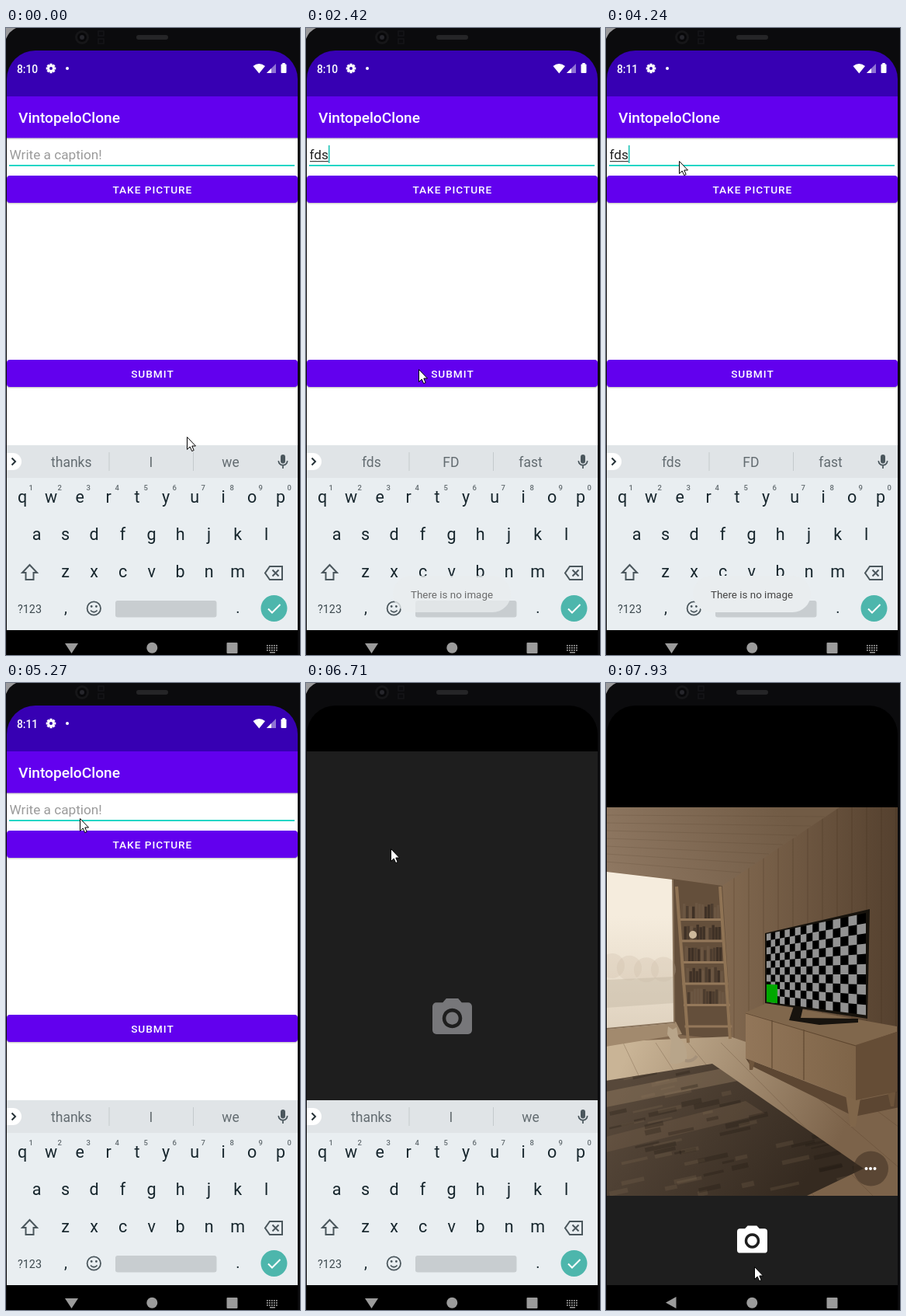
An HTML page with a canvas that plays this animation: 379x807 px, repeating every 8000 ms.

```html
<!DOCTYPE html>
<html lang="en">
<head>
<meta charset="utf-8">
<title>Phone demo</title>
<style>
html, body { margin: 0; width: 100%; height: 100%; overflow: hidden; background: #0b0b0d; }
canvas { display: block; }
</style>
</head>
<body>
<canvas id="stage" width="379" height="807"></canvas>
<script>
const c = document.getElementById('stage').getContext('2d');
const LOOP = 8000;
const PRESS_SUBMIT = 2180, TYPE = 1330, ERASE = 4300, PRESS_TAKE = 5390;
const LEAVE = 6590, CAMERA = 6710, HIDE_KEYS = 7650, PREVIEW = 7780;

// Pointer moves: start ms, end ms, x, y
const moves = [
  [0, 0, 233, 526], [0, 630, 126, 192], [630, 1020, 98, 172], [1020, 1330, 106, 200],
  [1330, 1870, 145, 439], [2660, 2810, 214, 686], [2810, 3000, 189, 764],
  [3080, 3840, 94, 171], [5200, 5640, 109, 213], [6990, 7650, 183, 775], [7780, 7930, 191, 751]
];

const clamp = v => Math.min(1, Math.max(0, v));
const mix = (a, b, k) => a + (b - a) * k;

function pointer(t) {
  let x = 0, y = 0;
  for (const [from, to, x1, y1] of moves) {
    if (t < from) break;
    const k = to > from ? clamp((t - from) / (to - from)) : 1;
    const e = k * k * (3 - 2 * k);
    x = mix(x, x1, e);
    y = mix(y, y1, e);
  }
  return [x, y];
}
function typed(t) {
  const erased = Math.max(0, Math.ceil((t - ERASE) / 190));
  return t < TYPE ? '' : 'fds'.slice(0, Math.max(0, 3 - erased));
}
const caretOn = t => t >= 510 && t < 5210 && Math.floor((t - TYPE) / 485) % 2 === 0;

function rect(x, y, w, h, fill, r = 0) {
  c.fillStyle = fill;
  c.beginPath();
  c.roundRect(x, y, w, h, r);
  c.fill();
}
function disc(x, y, r, fill) {
  c.fillStyle = fill;
  c.beginPath();
  c.arc(x, y, r, 0, 7);
  c.fill();
}
function shape(d, fill) {
  c.fillStyle = fill;
  c.fill(new Path2D(d), 'evenodd');
}
function stroke(d, color, w = 2) {
  c.strokeStyle = color;
  c.lineWidth = w;
  c.stroke(new Path2D(d));
}
function text(s, x, y, size, fill, { weight = 400, align = 'left', gap = 0 } = {}) {
  c.font = `${weight} ${size}px Roboto, sans-serif`;
  c.letterSpacing = gap + 'px';
  c.textAlign = align;
  c.fillStyle = fill;
  c.fillText(s, x, y);
}
function fade(color0, color1, x0, y0, x1, y1) {
  const g = c.createLinearGradient(x0, y0, x1, y1);
  g.addColorStop(0, color0);
  g.addColorStop(1, color1);
  return g;
}
function seeded(seed) {
  return () => (seed = seed * 16807 % 2147483647) / 2147483647;
}

function phone() {
  rect(0, 0, 379, 807, '#0b0b0d');
  shape('M0 0H13Q4 4 0 14Z', '#9a9a9c');
  disc(98, 12, 9, '#161618');
  disc(98, 12, 6, '#08080a');
  disc(98, 12, 3, '#26262b');
  stroke('M119 4h7v6h-7zM119 14h7v6h-7z', '#161618', 1.5);
  rect(168, 9, 41, 6, '#252527', 3);
}

function statusBar(t) {
  rect(0, 29, 379, 59, '#3700b3');
  text(t < 3200 ? '8:10' : '8:11', 14, 57.5, 13.8, '#fff', { weight: 500 });
  for (let i = 0; i < 8; i++) {
    c.save();
    c.translate(58, 52);
    c.rotate(i * Math.PI / 4);
    rect(-1.6, -6.3, 3.2, 4, '#fff');
    c.restore();
  }
  disc(58, 52, 4.7, '#fff');
  disc(58, 52, 2, '#3700b3');
  disc(79, 52, 2, '#fff');
  if (t >= 5640) {
    shape('M302.5 51a4.5 4.5 0 0 1 9 0q0 3-4.5 7.5q-4.5-4.5-4.5-7.5z', '#fff');
    disc(307, 51, 3, '#3700b3');
    disc(307, 51, 1.4, '#fff');
  }
  shape('M318.5 49Q326.3 43 334 49L326.3 58.5Z', '#fff');
  shape('M348 46V58H336Z', '#8f73d4');
  shape('M342 52V58H336Z', '#fff');
  rect(354.5, 46.5, 7, 11.5, '#fff', 1);
  rect(356.3, 45, 3.4, 2, '#fff');
}

function button(label, y, pressed, t) {
  rect(1, y + 1, 375, 35.5, 'rgba(0,0,0,.18)', 4);
  rect(1, y, 375, 35, '#6200ee', 4);
  const k = (t - pressed) / 240;
  if (k >= 0 && k < 1) {
    c.save();
    c.beginPath();
    c.roundRect(1, y, 375, 35, 4);
    c.clip();
    disc(...pointer(t), 100 + 280 * k, `rgba(255,255,255,${.24 * (1 - k)})`);
    c.restore();
  }
  text(label, 188.9, y + 23, 13.7, '#fff', { weight: 500, align: 'center', gap: .95 });
}

function form(t) {
  const leaving = t >= LEAVE;
  rect(0, 88, 379, 450, '#fff');
  statusBar(t);
  c.save();
  if (leaving) c.translate(0, -.8);
  rect(0, 141, 379, 3, fade('#bbb', '#fff', 0, 141, 0, 144));
  rect(0, 88, 379, 53.5, '#6200ee');
  text('VintopeloClone', 16, 122, 19.15, '#fff', { weight: 500 });

  const word = typed(t);
  text(word || 'Write a caption!', 4.5, 169, 17.2, word ? '#222' : '#9a9a9a');
  const w = word ? c.measureText(word).width : 0;
  rect(5, 171, w, 1.2, '#444');
  if (caretOn(t)) rect(4.5 + w, 151, 1.8, 23, '#2fc9bd');
  rect(4, 176, 368, 2, '#25d6c6');

  button('TAKE PICTURE', 190, PRESS_TAKE, t);
  button('SUBMIT', 427, PRESS_SUBMIT, t);
  c.restore();
  if (leaving) rect(0, 29, 379, 508, 'rgba(0,0,0,.05)');
}

function keyboard(t) {
  const ink = '#17262d', icon = '#4b575d', soft = '#636c71';
  const spread = (items, x, step, draw) => [...items].forEach((s, i) => draw(s, x + i * step));
  const label = (y, size, fill, weight) => (s, x) => text(s, x, y, size, fill, { weight, align: 'center' });

  rect(0, 537, 379, 238, '#e9eef1');
  rect(0, 537, 379, 42, '#e0e4e7');
  rect(-10, 547, 30, 22, '#fff', 11);
  stroke('M7.5 553.5L12 558L7.5 562.5', '#263238');
  const hints = ['thanks I we', 'f F for', 'fds FD fast', 'fds FD fast'][typed(t).length];
  spread(hints.split(' '), 84.3, 102.6, label(565, 17.5, soft));
  rect(132.5, 546, 1, 24, '#c3c9cc');
  rect(241, 546, 1, 24, '#c3c9cc');
  rect(354, 549, 6, 11.5, icon, 3);
  stroke('M351.3 557a5.7 5.7 0 0 0 11.4 0M357 563v4', icon, 1.7);

  ['qwertyuiop', 'asdfghjkl', 'zxcvbnm'].forEach((keys, i) =>
    spread(keys, 187.6 - (keys.length - 1) * 18.5, 37, label(610.5 + i * 48, 21.5, ink)));
  spread('1234567890', 32.3, 37, label(595, 9.5, soft, 500));

  stroke('M30.5 691L40 701H35.5V710H25.5V701H21Z', icon);
  stroke('M340 693H356V710H340L334 701.5ZM343.5 697.5L351.5 705.5M351.5 697.5L343.5 705.5', icon);
  label(752.5, 14.3, '#3c484e')('?123', 30.5);
  spread(',.', 77, 222, label(753, 20, ink));
  stroke('M122 747a8.7 8.7 0 1 0-17.4 0a8.7 8.7 0 1 0 17.4 0M109 749.5q4.3 4.5 8.6 0', icon, 1.8);
  disc(110.2, 744.5, 1.4, icon);
  disc(116.4, 744.5, 1.4, icon);
  rect(141, 737, 130.5, 21.5, '#c8cdd0', 3);
  disc(345.5, 747, 17, '#4db6ac');
  stroke('M338 747.5L343 752.5L353.5 742', '#fff');
}

function toast(t) {
  c.globalAlpha = clamp((t - 2150) / 350) * clamp((4700 - t) / 350);
  rect(112, 705, 152, 47, '#e9edef', 23.5);
  text('There is no image', 188, 734, 13.4, '#444', { align: 'center' });
  c.globalAlpha = 1;
}

function navBar(keys) {
  const grey = '#9b9b9b';
  rect(0, 775, 379, 32, '#000');
  shape(keys ? 'M76 792H93L84.5 805Z' : 'M90.5 790V805L77 797.5Z', grey);
  if (keys) {
    for (let i = 0; i < 15; i++) rect(336 + i % 5 * 3, 794 + (i / 5 | 0) * 3, 1.8, 1.8, grey);
    rect(340, 803, 7, 1.5, grey);
  }
  disc(188.3, 797.7, 7, grey);
  rect(284.5, 791, 14, 14, grey, 1);
}

function cameraIcon(x, y, k, fill) {
  c.save();
  c.translate(x - 12 * k, y - 11 * k);
  c.scale(k, k);
  shape('M9 2L7.2 4H4a2 2 0 0 0-2 2v12a2 2 0 0 0 2 2h16a2 2 0 0 0 2-2V6a2 2 0 0 0-2-2h-3.2L15 2zM12 7a5 5 0 1 0 .01 0zM12 8.8a3.2 3.2 0 1 1-.01 0z', fill);
  c.restore();
}

function television() {
  shape('M205 322L340 291L337 432L205 412Z', '#17130d');
  const cols = 16, rows = 10, near = .67;
  // perspective: the right edge is closer to the viewer
  const spot = (u, v) => {
    const k = u * near / (1 - u * (1 - near));
    return [207 + 128 * k, mix(323 - 27 * k, 410.5 + 17 * k, v)];
  };
  const tile = (u, v, w, h, fill) =>
    shape(`M${spot(u, v)}L${spot(u + w, v)}L${spot(u + w, v + h)}L${spot(u, v + h)}Z`, fill);
  tile(0, 0, 1, 1, '#000');
  for (let i = 0; i < cols; i++)
    for (let j = i % 2; j < rows; j += 2) tile(i / cols, j / rows, 1 / cols, 1 / rows, '#929292');
  tile(0, .74, .155, .26, '#00a800');
}

function shelf(rnd) {
  const books = ['#4d3d2f', '#6b5642', '#3f3126'];
  for (let i = 0; i < 6; i++) {
    const y = 303 + i * 27.5, x = 94 + i * 1.5, w = 56 + i;
    if (i < 5) for (let b = 5; b < w - 6; b += 4) {
      const h = 14 + rnd() * 6;
      rect(x + b, y - h, 3.4, h, books[rnd() * 3 | 0]);
    }
    rect(x, y, w, 3, '#94785a');
  }
  disc(112, 324, 5, '#cdb99c');
  stroke('M91 262L106 463M147 262L160 458', '#8f7354', 4);
}

function room() {
  const rnd = seeded(71);
  c.save();
  c.beginPath();
  c.rect(0, 160, 379, 500);
  c.clip();
  // walls and ceiling
  rect(0, 160, 379, 500, fade('#826950', '#54402e', 150, 0, 379, 0));
  for (let x = 165; x < 379; x += 19) stroke(`M${x} 160V470`, 'rgba(45,29,16,.22)', 1);
  shape('M0 160H301L150 261L85 252L0 243Z', fade('#8f7862', '#715b45', 0, 250, 230, 160));
  for (let i = 1; i < 8; i++) stroke(`M0 ${160 + i * 10}L${300 - i * 18} ${160 + i * 12}`, 'rgba(70,50,33,.16)', 1);
  shape('M85 252L150 261L162 460L88 452Z', '#644f3b');
  // floor
  shape('M0 462L160 455L379 530V660H0Z', fade('#c9b496', '#7c634a', 30, 470, 300, 590));
  for (let i = 0; i < 8; i++) stroke(`M${i * 42 - 20} 463L${i * 76 + 40} 660`, 'rgba(75,52,33,.25)', 1);
  // window
  shape('M0 446L90 436L98 452L0 468Z', '#a28a6e');
  shape('M0 243L86 253L88 438L0 446Z', fade('#f5ecdd', '#e0d3c0', 0, 300, 0, 440));
  for (let i = 0; i < 4; i++) disc(8 + i * 22, 364 + rnd() * 8, 16, 'rgba(205,190,168,.3)');
  shape('M0 382L87 378V412L0 418Z', 'rgba(200,188,168,.5)');
  stroke('M0 445L88 437M86 253L88 438', '#8a745c');
  shelf(rnd);
  // cabinet
  shape('M180 483L322 538L379 526V546L320 558L186 492Z', '#5c4632');
  shape('M184 478L193 482L189 498H185ZM362 522L374 520L371 545H367Z', '#6d543b');
  shape('M309 530L328 534L322 571H315Z', '#80664a');
  shape('M180 424L207 412L375 442V449L322 467Z', '#80674c');
  shape('M180 424L322 466V537L180 483Z', fade('#927659', '#7e6448', 180, 0, 322, 0));
  shape('M322 466L375 449V526L322 537Z', '#654d36');
  stroke('M214 434V496M255 446V511M180 425L322 467', 'rgba(62,42,25,.55)', 1.2);
  shape('M242 416L254 418L251 431L325 432V437L275 440L236 434Z', '#17130e');
  television();
  // rug with worn streaks and bands of daylight
  const rug = 'M0 512L137 490L332 625L259 660H0Z';
  shape(rug, fade('#57483a', '#352a20', 40, 500, 250, 650));
  c.save();
  c.clip(new Path2D(rug));
  shape('M0 526L150 496L170 512L0 546Z', 'rgba(165,140,110,.35)');
  shape('M0 584L180 538L205 554L0 604Z', 'rgba(145,120,92,.22)');
  for (let i = 0; i < 90; i++) {
    const x = rnd() * 320, y = 490 + rnd() * 170, w = 10 + rnd() * 30;
    stroke(`M${x} ${y}l${w} ${-w * .22}`, rnd() < .5 ? 'rgba(30,22,15,.28)' : 'rgba(150,126,98,.17)', 2 + rnd() * 5);
  }
  c.restore();
  // cat
  shape('M79 452L80 442L86 446L91 443L93 455Q106 467 104 484Q93 493 82 489L84 460Z', '#b8a58a');
  stroke('M102 486Q112 488 117 480', '#a5917a', 4);
  c.restore();

  disc(341.5, 625, 22.5, 'rgba(62,48,36,.55)');
  for (let i = -1; i < 2; i++) disc(341 + i * 5.5, 625, 2, '#fff');
}

function cameraApp(t) {
  rect(0, 29, 379, 59, '#000');
  rect(0, 88, 379, 719, '#1e1e1e');
  if (t < PREVIEW) cameraIcon(188.5, 429, 2.55, '#77777a');
  else {
    rect(0, 88, 379, 72, '#000');
    room();
    cameraIcon(188.5, 716, 1.95, '#fff');
  }
}

function arrow(t) {
  const d = 'M.5 .5V16.5L4.2 13L6.7 18.6L9.2 17.5L6.8 12H11.5Z';
  c.save();
  c.translate(...pointer(t).map(Math.round));
  shape(d, '#fff');
  stroke(d, '#000', 1);
  c.restore();
}

function draw(now) {
  const t = now % LOOP, keys = t < HIDE_KEYS;
  phone();
  c.save();
  c.beginPath();
  c.roundRect(1, 29, 375, 778, [37, 37, 0, 0]);
  c.clip();
  if (t < CAMERA) form(t);
  else cameraApp(t);
  if (keys) keyboard(t);
  toast(t);
  navBar(keys);
  c.restore();
  arrow(t);
}

let start;
function frame(now) {
  start ??= now;
  draw(Math.max(0, now - start));
  requestAnimationFrame(frame);
}
draw(0);
requestAnimationFrame(frame);
</script>
</body>
</html>
```
